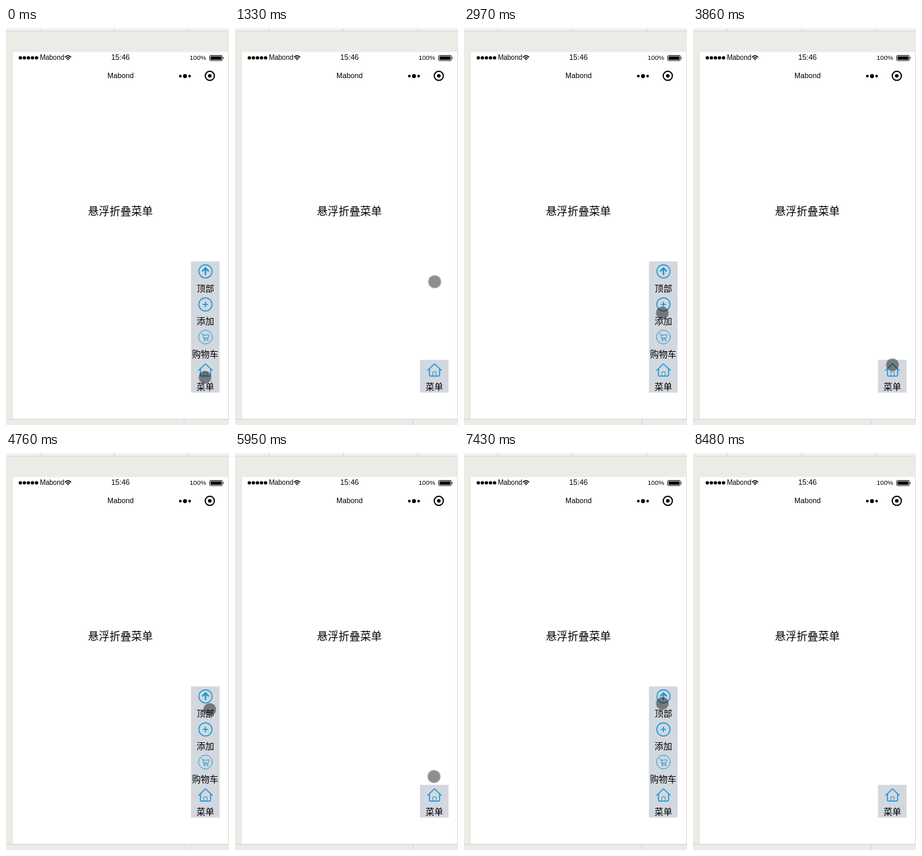
An HTML page for the animation above (8930 ms loop, 330 px wide and 586 px high).

```html
<!DOCTYPE html>
<html lang="zh">
<head>
<meta charset="utf-8">
<title>悬浮折叠菜单</title>
<style>
html, body { margin: 0; width: 100%; height: 100%; overflow: hidden; background: #ecebe6; }
svg { display: block; width: 100%; height: 100%; }
text { text-anchor: middle; font-family: "Liberation Sans", Arial, sans-serif; fill: #000; }
.zh { font-family: "Noto Sans CJK SC", "Noto Sans CJK", "Noto Sans", sans-serif; font-size: 13px; }
.icon { fill: none; stroke: #1296db; stroke-width: 1.5; stroke-linecap: round; stroke-linejoin: round; }
.thin { stroke-width: .9; }
</style>
</head>
<body>
<svg viewBox="0 0 330 586">
  <!-- window chrome -->
  <rect width="330" height="586" fill="#ecebe6"/>
  <rect width="330" height="4" fill="#f3f3f2"/>
  <path d="M0 4.5H330M50.5 0V4M160.5 0V4M270.5 0V4" stroke="#d6d6d4"/>
  <rect x="9" y="35" width="1" height="542" fill="#e3e2dd"/>
  <rect x="10" y="35.5" width="319" height="541.5" fill="#fff"/>
  <rect x="329" y="35" width="1" height="542" fill="#dddcd8"/>
  <path d="M0 577.5H330M263.5 578V586" stroke="#d3d3d0"/>

  <!-- status bar -->
  <g id="signal"></g>
  <text x="68.2" y="47.2" font-size="10">Mabond</text>
  <g fill="none" stroke="#000" stroke-width="1.5">
    <path d="M87.3 43.1Q91.8 38.9 96.3 43.1M89 45Q91.8 42.4 94.6 45"/>
    <path d="M90.2 46.1Q91.8 44.9 93.4 46.1L91.8 47.7Z" fill="#000" stroke="none"/>
  </g>
  <text x="169.4" y="47.2" font-size="11">15:46</text>
  <text x="284" y="47.2" font-size="9.6">100%</text>
  <rect x="301.5" y="40.5" width="18.6" height="7.6" rx="1.2" fill="none" stroke="#000" stroke-width=".9"/>
  <rect x="302.8" y="41.8" width="16" height="5"/>
  <path d="M321.2 42.8Q323.2 44.3 321.2 45.8Z"/>

  <!-- title bar -->
  <text x="169.5" y="74.2" font-size="10.8">Mabond</text>
  <circle cx="258" cy="71" r="2"/>
  <circle cx="264.9" cy="71" r="2.9"/>
  <circle cx="271.7" cy="71" r="2"/>
  <circle cx="301.6" cy="70.6" r="6.8" fill="none" stroke="#000" stroke-width="1.8"/>
  <circle cx="301.6" cy="70.6" r="2.7"/>

  <text class="zh" x="169.3" y="276.4" style="font-size:16px">悬浮折叠菜单</text>

  <!-- folding part of the menu -->
  <g id="fold">
    <rect x="273.7" y="344.5" width="42.3" height="146" fill="#d3d8de"/>
    <g class="icon">
      <circle cx="295.2" cy="359.2" r="9.8"/>
      <path d="M295.2 364.8V355M290.3 359.2L295.2 354.4L300.1 359.2" style="stroke-width:2.2;stroke-linecap:butt;stroke-linejoin:miter"/>
      <circle cx="295.1" cy="408" r="9.8"/>
      <path d="M291.6 408.1H298.6M295.1 404.6V411.6"/>
      <g class="thin">
        <circle cx="295.2" cy="456.2" r="10.2"/>
        <path d="M289.4 451.2L291.4 451.7L293 459.4H299M292 453.6L300.4 452.8L299.4 457.4H292.7"/>
        <circle cx="293.6" cy="461.2" r=".6"/>
        <circle cx="298.4" cy="461.2" r=".6"/>
      </g>
    </g>
    <text class="zh" x="295" y="388.6">顶部</text>
    <text class="zh" x="295" y="437.1">添加</text>
    <text class="zh" x="294.7" y="485.6">购物车</text>
  </g>

  <!-- menu button -->
  <rect x="273.7" y="489.8" width="42.3" height="48.4" fill="#d3d8de"/>
  <g class="icon">
    <path d="M285.1 505.3L295.2 495.7L305.3 505.3"/>
    <path d="M287.7 503.6V512.4Q287.7 513.8 289.1 513.8H301.3Q302.7 513.8 302.7 512.4V503.6"/>
    <path class="thin" d="M292.8 513.5V507.6H297.6V513.5"/>
  </g>
  <text class="zh" x="295" y="534.1">菜单</text>

  <g id="pointer">
    <circle r="10" fill="none" stroke="#fff" stroke-opacity=".35"/>
    <circle r="9.6" fill-opacity=".44"/>
  </g>
</svg>
<script>
const LOOP = 8930, TICKS = 60;
const byId = id => document.getElementById(id);

byId("signal").innerHTML = [0, 1, 2, 3, 4]
  .map(i => `<circle cx="${21.2 + i * 6}" cy="44.1" r="2.5"/>`).join("");

// Pointer strokes: first tick, number of ticks, bend point, end point
const start = [294.5, 515.5];
const strokes = [
  [1, 7, [322, 287], [295.5, 374.5]],
  [11, 3, [299, 440], [300, 530]],
  [17, 4, [306, 440], [293.5, 420.5]],
  [24, 4, [294, 480], [296, 517]],
  [32, 1, start, [301.5, 378.5]],
  [33, 4, [296, 348], [293, 371]],
  [40, 1, start, [294.5, 477.5]],
  [42, 2, [292, 505], [291, 519]],
  [47, 4, [293, 385], [293.5, 369.5]],
  [55, 3, [291, 480], [286, 605]]
];

// The menu flips between open and closed at these ticks, open first
const flips = [0, 9, 15, 22, 29, 40, 45, 53];

const bend = (a, b, c, u) =>
  a * (1 - u) ** 2 + 2 * b * u * (1 - u) + c * u * u;

// Steps are [tick, style]; each holds until the next
function play(id, steps) {
  const frames = steps.map(([tick, style]) => ({
    offset: Math.max(0, tick / TICKS - 12 / LOOP),
    easing: "steps(1, end)",
    ...style
  }));
  frames.push({ ...frames[frames.length - 1], offset: 1 });
  byId(id).animate(frames, { duration: LOOP, iterations: Infinity });
}

const place = ([x, y]) => ({ transform: `translate(${x}px, ${y}px)` });
const moves = [[0, place(start)]];
let from = start;
for (const [tick, count, mid, to] of strokes) {
  for (let i = 1; i <= count; i++) {
    const point = [0, 1].map(k => bend(from[k], mid[k], to[k], i / count));
    moves.push([tick + i - 1, place(point)]);
  }
  from = to;
}

play("pointer", moves);
play("fold", flips.map((tick, i) => [tick, { opacity: i % 2 ? 0 : 1 }]));
</script>
</body>
</html>
```
